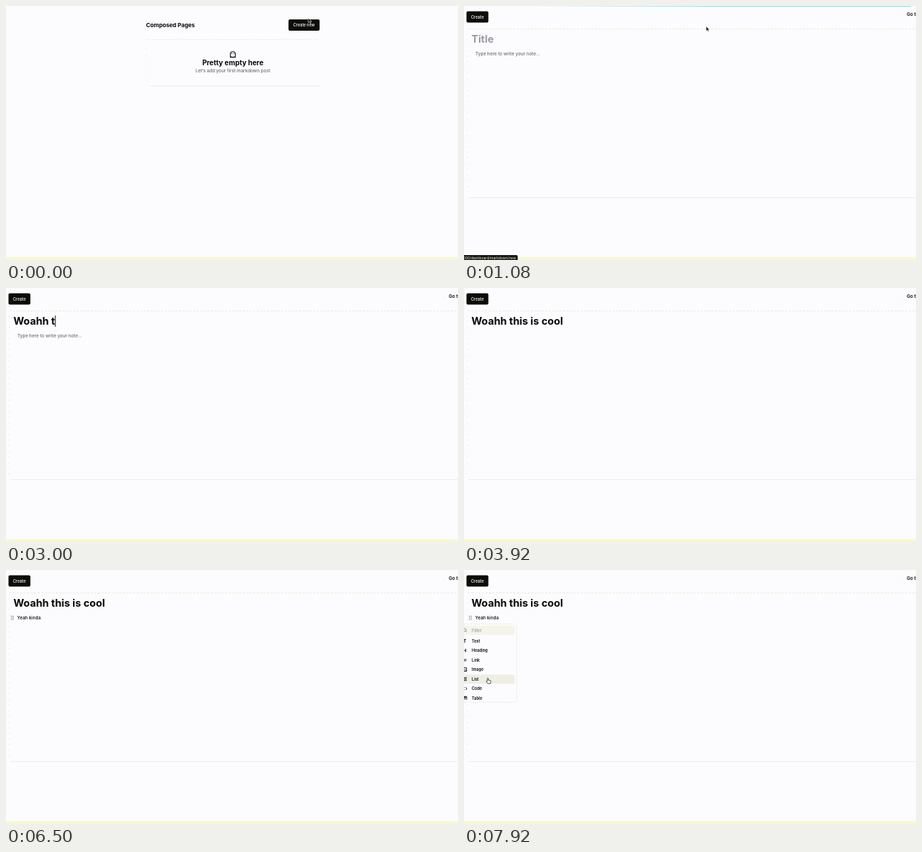
An HTML page with a canvas that plays this animation: 640 by 360 pixels, repeating every 8000 ms.

```html
<!DOCTYPE html>
<html lang="en">
<head>
<meta charset="utf-8">
<title>Note editor</title>
<style>
  html, body { margin: 0; width: 100%; height: 100%; overflow: hidden; background: #fcfcfe; }
  canvas { display: block; width: 640px; height: 360px; }
</style>
</head>
<body>
<canvas width="640" height="360"></canvas>
<script>
const ctx = document.querySelector('canvas').getContext('2d');
const LOOP = 8000;
const OPEN_EDITOR = 830, FOCUS_TITLE = 1670, TYPE_TITLE = 2670, FOCUS_NOTE = 3670;
const SHOW_HANDLE = 5830, OPEN_MENU = 7080;
const PAGE = '#fcfcfe', INK = '#08080a', BUTTON = '#0d0d0a', MUTED = '#6c6c72', HINT = '#9a9aa4';
const BORDER = '#e9e9da', DOT = '#dcdce4', PALE = '#f4f4ea', STRIP = '#f7f7d2';
const TITLE = 'Woahh this is cool', NOTE = 'Yeah kinda';
const MENU = ['Text', 'Heading', 'Link', 'Image', 'List', 'Code', 'Table'];

// time, x, y, pointer shape from that time on
const POINTER = [
  [0, 428, 17, 'arrow'], [170, 427, 20, 'hand'], [600, 423, 23, 'hand'],
  [830, 423, 23, 'arrow'], [920, 423, 24, 'arrow'], [1420, 95, 44, 'beam'],
  [1670, 82.5, 48, 'beam'], [2670, 82.5, 48, 'none'],
  [5830, 5, 49, 'arrow'], [6420, -4, 82, 'arrow'], [6670, -4, 82, 'arrow'],
  [6920, -9, 86, 'arrow'], [7170, -9, 90, 'hand'], [7830, 33, 153, 'hand'], [8000, 33, 153, 'hand']
];

const clamp = (v, lo = 0, hi = 1) => Math.min(hi, Math.max(lo, v));
const smooth = p => p * p * (3 - 2 * p);

function box(x, y, w, h, color, radius = 0) {
  ctx.fillStyle = color;
  ctx.beginPath();
  ctx.roundRect(x, y, w, h, radius);
  ctx.fill();
}

function text(str, x, y, size, weight = 500, color = INK, align = 'left') {
  ctx.font = `${weight} ${size}px Inter, sans-serif`;
  ctx.textAlign = align;
  ctx.fillStyle = color;
  ctx.fillText(str, x, y);
  return ctx.measureText(str).width;
}

function line(points, color = INK, width = 1, dash = []) {
  ctx.strokeStyle = color;
  ctx.lineWidth = width;
  ctx.setLineDash(dash);
  ctx.beginPath();
  points.forEach(([x, y]) => ctx.lineTo(x, y));
  ctx.stroke();
  ctx.setLineDash([]);
}

function shape(d, x, y, fill, stroke = INK, width = 0.8) {
  const path = new Path2D(d);
  ctx.save();
  ctx.translate(x, y);
  ctx.lineWidth = width;
  ctx.strokeStyle = stroke;
  if (fill) { ctx.fillStyle = fill; ctx.fill(path); }
  ctx.stroke(path);
  ctx.restore();
}

// On for 250 ms, half bright for one moment, then off until 500 ms
function caret(x, y, h, t, since) {
  const p = (t - since) % 500;
  ctx.globalAlpha = p < 250 ? 1 : p < 330 ? 0.5 : 0;
  box(x, y, 1, h, INK);
  ctx.globalAlpha = 1;
}

function pointerAt(t) {
  const i = Math.max(0, POINTER.findIndex(k => k[0] > t) - 1);
  const [t0, x0, y0, kind] = POINTER[i], [t1, x1, y1] = POINTER[i + 1];
  const p = smooth((t - t0) / (t1 - t0));
  return { x: x0 + (x1 - x0) * p, y: y0 + (y1 - y0) * p, kind };
}

function drawPointer({ x, y, kind }) {
  if (kind === 'arrow') shape('M0 0V6.5L1.6 5.2L2.7 7.6L3.8 7.1L2.8 4.8H4.8Z', x, y, INK, '#fff', 0.6);
  if (kind === 'hand') shape('M0 .6Q.7-.4 1.3.6V3L4.6 3.6Q5.2 4 5 5.2L4.3 8H.8L-1.6 5Q-1.5 4 0 4.8Z', x, y, '#fff', INK, 0.7);
  if (kind === 'beam') shape('M-1.6-3.5Q0-3.5 0-2.5Q0-3.5 1.6-3.5M0-2.5V2.8M-1.6 3.8Q0 3.8 0 2.8Q0 3.8 1.6 3.8', x, y, null, '#55555a');
}

function drawDashboard(pointer) {
  text('Composed Pages', 198.3, 29.8, 8.1, 700);
  box(400, 19, 44, 16, pointer.y > 19 ? '#25251f' : BUTTON, 2);
  text('Create new', 422, 29, 5.6, 500, '#fff', 'center');

  line([[198, 47.5], [444, 47.5]], DOT, 1, [1, 2]);
  line([[198.5, 61], [198.5, 111]], DOT, 1, [1, 8]);
  line([[204, 113.5], [444, 113.5]], DOT, 1, [1, 1]);

  shape('M-3.5 4V-.5Q-3.5-4 0-4T3.5-.5V4L1.8 3.4L0 4L-1.8 3.4Z', 321.2, 68.8, null, INK, 1.1);
  box(319.3, 67, 1, 1, INK);
  box(322.2, 67, 1, 1, INK);
  text('Pretty empty here', 321.2, 83.6, 9.9, 700, INK, 'center');
  text('Let’s add your first markdown post', 321.2, 94, 6.4, 500, MUTED, 'center');
}

function drawEditor(t) {
  box(3.5, 7.5, 31, 16, BUTTON, 2);
  text('Create', 19, 17.6, 5.7, 500, '#fff', 'center');
  box(620, 13, 1, 1, DOT);
  text('Go to dashboard', 627, 14, 6.5, 600);
  line([[5, 32.5], [640, 32.5]], BORDER, 1, [3, 2]);
  line([[4.5, 39], [4.5, 266]], DOT, 1, [1, 7]);
  line([[6, 271.5], [640, 271.5]], DOT, 1, [1, 1]);

  const typed = t < TYPE_TITLE ? 0 : Math.floor((t - TYPE_TITLE) / 53) + 1;
  const title = TITLE.slice(0, typed);
  const width = text(title || 'Title', 10.4, 52.4, 14.6, 700, title ? INK : HINT);
  if (t >= FOCUS_TITLE && t < FOCUS_NOTE) {
    if (title) caret(10.4 + width, 39, 16, t, t);
    else caret(10, 39, 17, t, FOCUS_TITLE);
  }
  if (t < FOCUS_NOTE) text('Type here to write your note...', 16, 70, 6.4, 500, MUTED);
  else drawNote(t);
}

function drawNote(t) {
  const first = t < 4330 ? 0 : Math.min(6, Math.floor((t - 4330) / 84) + 1);
  const rest = t < 5080 ? 0 : Math.floor((t - 5080) / 84) + 1;
  const width = text(NOTE.slice(0, first + rest), 15.8, 70, 6.35);
  const lastKey = t < 4330 ? 3590 : t < 4750 ? t : t < 5080 ? 4750 : t < 5332 ? t : 5332;
  if (t < 5750) caret(15.3 + width, 63, 9, t, lastKey);
  if (t >= SHOW_HANDLE) {
    for (let i = 0; i < 6; i++) box(7 + (i % 2) * 2.5, 65 + (i >> 1) * 2.2, 1.4, 1, MUTED);
  }
}

const ICONS = [
  'M-1-2H3M1-2V2.5',
  'M-1-2.3V2.3M2.5-2.3V2.3M-1 0H2.5',
  'M0 1.8L3-1.8M-1 .5L1-1.5M1.5 1.8L3.5 0',
  'M-1-2.5H3.6V2.5H-1ZM-1 2L1.5 0L3.6 2',
  'M-1-2H4M-1 0H4M-1 2H4',
  'M.5-2L-1 0L.5 2M2.5-2L4 0L2.5 2',
  'M-1-2.3H3.8V2.3M-1-.8H3.8M1.4-2.3V2.3'
];

function drawMenu(t, pointer) {
  ctx.save();
  ctx.globalAlpha = clamp((t - OPEN_MENU + 40) / 120);
  box(-10, 76, 85, 112, PAGE, 3);
  ctx.globalAlpha = 1;
  line([[0, 76.5], [72, 76.5], [74.5, 79], [74.5, 185], [72, 187.5], [0, 187.5]], BORDER, 1, [2, 1]);
  box(-4, 79, 75.5, 13, PALE, 2);
  shape('M3 0A2 2 0 1 1-1 0A2 2 0 1 1 3 0M2.5 1.5L4 3', 0, 85, null, MUTED, 0.7);
  text('Filter', 11, 87.6, 5.8, 500, HINT);
  caret(10, 82, 7, t, OPEN_MENU);

  const active = clamp(Math.floor((pointer.y - 94) / 13.5), 0, MENU.length - 1);
  MENU.forEach((label, i) => {
    const y = 100.6 + i * 13.5;
    if (i === active) box(-4, y - 6.4, 75.5, 13, '#eeeee4', 2);
    shape(ICONS[i], 0, y, null, INK, 0.9);
    text(label, 11, y + 2, 5.6, 600);
  });
  ctx.restore();
}

function drawBrowser(t) {
  box(0, 356, 640, 4, STRIP);
  if (t >= 330 && t < 1250) {
    box(-4, 353, 80, 8, '#18180f', 2);
    text('localhost:3000/dashboard/markdown/new', 73.5, 358.8, 5, 400, '#eeeee8', 'right');
  }
  // Page loading bar
  if (t >= 670 && t < 1250) {
    const end = t < OPEN_EDITOR ? 38 * clamp((t - 640) / 110, 0, 1.3) : 50 + 583 * clamp((t - OPEN_EDITOR) / 250);
    const glow = ctx.createLinearGradient(0, 0, end, 0);
    glow.addColorStop(0.15, 'rgba(90,225,240,0)');
    glow.addColorStop(0.6, '#79e5f0');
    ctx.globalAlpha = 1 - clamp((t - 1080) / 170);
    box(0, 0, end, 1, glow);
    ctx.globalAlpha = 1;
  }
}

function draw(now) {
  const t = now % LOOP, pointer = pointerAt(t);
  box(0, 0, 640, 360, PAGE);
  if (t < OPEN_EDITOR) drawDashboard(pointer);
  else drawEditor(t);
  if (t >= OPEN_MENU) drawMenu(t, pointer);
  drawBrowser(t);
  drawPointer(pointer);
}

const start = performance.now();
function tick() {
  draw(performance.now() - start);
  requestAnimationFrame(tick);
}
tick();
</script>
</body>
</html>
```
